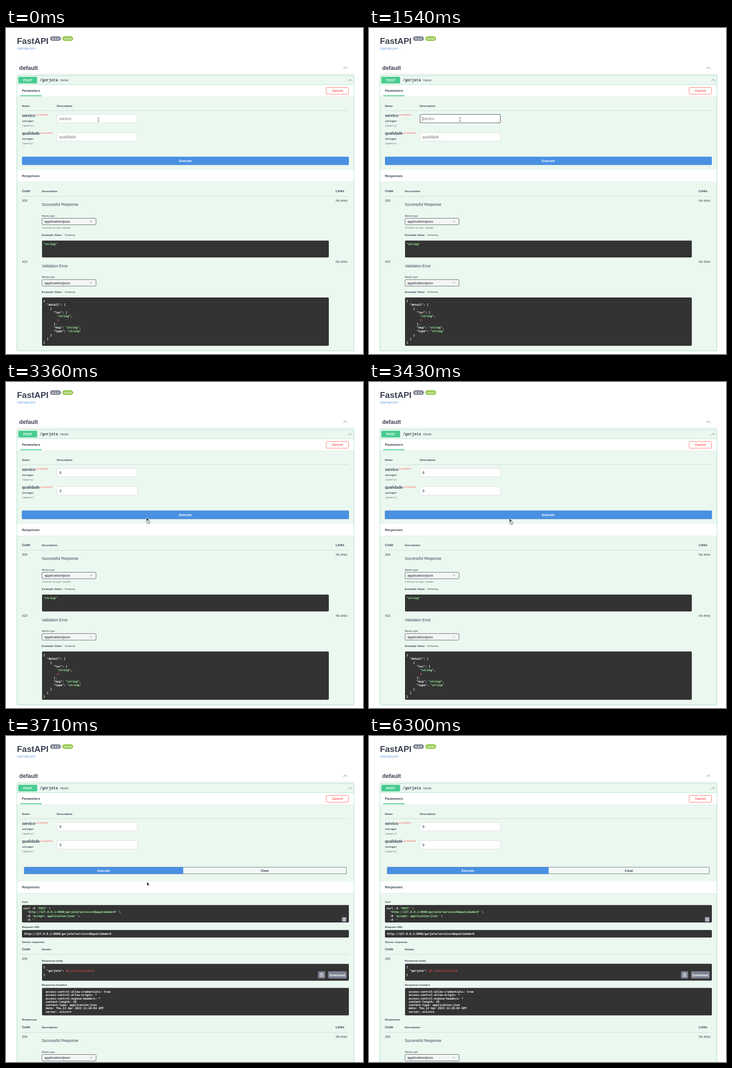
An HTML page that plays this animation: 783 px wide and 715 px high, repeating every 6.37 s.

```html
<!DOCTYPE html>
<html lang="en">
<head>
<meta charset="utf-8">
<title>API docs</title>
<style>
  html, body { margin: 0; width: 100%; height: 100%; overflow: hidden; background: #fff; }
  svg { display: block; width: 783px; height: 715px; }
  text { font-family: "Liberation Sans", Arial, sans-serif; fill: #3b4151; white-space: pre; }
  .b { font-weight: 700; }
  .i { font-style: italic; }
  .m { font-family: "Liberation Mono", monospace; }
  .code { font-family: "DejaVu Sans Mono", monospace; font-weight: 700; fill: #fff; }
  .mid { text-anchor: middle; }
  .w { fill: #fff; }
  .red { fill: #ff6060; }
  .g { fill: #a2fca2; }
  .n { fill: #d34a4a; }
  .ph { fill: #777; }
</style>
</head>
<body>
<svg id="stage" viewBox="0 0 783 715" xmlns="http://www.w3.org/2000/svg"></svg>
<script>
const LOOP = 6370;
const PANEL = '#ebf8f0', EDGE = '#9bdcbc', DARK = '#333', BLUE = '#4990e2', GREY = '#7d8293';

// Markup helpers
const text = (x, y, s, size, cls = '', extra = '') =>
  `<text x="${x}" y="${y}" font-size="${size}" class="${cls}" ${extra}>${s}</text>`;
const rect = (x, y, x2, y2, fill, rx = 0, extra = '') =>
  `<rect x="${x}" y="${y}" width="${x2 - x}" height="${y2 - y}" rx="${rx}" fill="${fill}" ${extra}/>`;
const frame = (x, y, x2, y2, fill, stroke, w = 1, extra = '') =>
  rect(x, y, x2, y2, fill, 2, `stroke="${stroke}" stroke-width="${w}" ${extra}`);
const rule = (x, x2, y, stroke = '#c9d3d0') =>
  `<path d="M${x} ${y}H${x2}" stroke="${stroke}" stroke-width="0.8"/>`;
const chevron = (x, y, w, h) =>
  `<path d="M${x - w} ${y}l${w} ${h}l${w} ${-h}" fill="none" stroke="#666" stroke-width="0.9"/>`;
const group = (id, body) => `<g id="${id}">${body}</g>`;

// Code lines: strings in backticks become green, digits after ~ become red
const code = (x, y, lines, step) => lines.map((line, k) => {
  const body = line.replace(/&/g, '&amp;')
    .replace(/`([^`]*)`/g, '<tspan class="g">$1</tspan>')
    .replace(/~([\d.]+)/, '<tspan class="n">$1</tspan>');
  return text(x, +(y + k * step).toFixed(2), body, 6.23, 'code');
}).join('');

const box = (x, y, x2, y2) => rect(x, y, x2, y2, DARK, 2);

const copyIcon = (x, y, s) => rect(x, y, x + s, y + s, GREY, 2) +
  `<g transform="translate(${x + s / 2} ${y + s / 2}) scale(${s < 12 ? 0.9 : 1})" fill="none" stroke="#fff" stroke-width="0.9">
    <path d="M3 -1V-3H-3V3.6H3V2.4M-1.2 -3.6H1.2M-1.6 -1H1.4M-1.6 1H-0.4M4 0.8H0.6M2 -0.6L0.6 0.8L2 2.2"/></g>`;

const param = (y, name, starX) =>
  text(35, y, name, 8.35, 'b') +
  text(starX, y + 0.7, '*', 8.5, 'b red') +
  text(starX + 5.4, y - 2.8, 'required', 5.6, 'red') +
  text(35, y + 11, 'integer', 6.25, 'm b') +
  text(35, y + 21, '(query)', 6.25, 'm i', 'opacity="0.85"');

const tableHead = (y, label, links) =>
  text(35, y, 'Code', 7.3, 'b') + text(78.5, y, label, 6.25, 'b') +
  (links ? text(723, y, 'Links', 7.3, 'b') : '') + rule(35, 752, y + 8.8);

const response = (y, status, label) =>
  text(35, y, status, 7.3) + text(723, y, 'No links', 7.3, 'i') +
  text(78.5, y + 9.4, label, 8.35) +
  text(78.5, y + 33, 'Media type', 5.85) +
  frame(79, y + 36.5, 197.5, y + 50.8, '#f2f6f4', '#63686e', 1) +
  text(84.5, y + 46.3, 'application/json', 7.35, 'b', 'opacity="0.9"') +
  chevron(186.5, y + 42.4, 2.2, 2.2);

const tabs = y => text(78.5, y, 'Example Value', 6.25, 'b') +
  rect(124.9, y - 6, 125.5, y + 1, '#b5bdbb') + text(128.5, y, 'Schema', 6.25);

const band = (y, label) => rect(24.5, y, 762.5, y + 26.2, '#fff') +
  rule(24.5, 762.5, y + 26.4, '#dde5e1') + text(35, y + 15.6, label, 7.3, 'b');

const header =
  text(24, 34.6, 'FastAPI', 18.6, 'b') +
  rect(96.7, 18.2, 120.3, 28.2, GREY, 5) + text(108.5, 25.6, '0.1.0', 6.7, 'b w mid') +
  rect(123.7, 18.2, 147.1, 28.2, '#8ac23a', 5) + text(135.4, 25.6, 'OAS3', 6.7, 'b w mid') +
  text(24, 47, '/openapi.json', 6.8, '', 'style="fill:#6a9fe0"') +
  text(29, 92, 'default', 12.5, 'b') +
  chevron(744.5, 89.5, 4.4, -4.4) + rule(24, 764, 101, '#d3d5d9');

const panelTop =
  rect(27, 107, 68.3, 121.6, '#49cc90', 1.5) + text(47.7, 117, 'POST', 7.3, 'b w mid') +
  text(74, 117.3, '/gorjeta', 8.35, 'm b') + text(119, 117, 'Home', 6.75) +
  chevron(755, 116.8, 4.4, -4.4) + rule(24, 763, 124.3, EDGE) +
  rect(24.5, 124.8, 762.5, 151, '#fff') + rule(24.5, 762.5, 151.2, '#dde5e1') +
  text(35, 140.3, 'Parameters', 7.3, 'b') + rect(31, 147.6, 78, 149.6, '#49cc90') +
  frame(702.3, 130.3, 751.3, 145.2, '#fff', '#ff7466') + text(727, 140.3, 'Cancel', 7.3, 'b red mid') +
  text(35, 173, 'Name', 6.25, 'b') + text(111.3, 173, 'Description', 6.25, 'b') + rule(35, 752, 181.2) +
  param(194.5, 'servico', 66.2) + param(234.3, 'qualidade', 76) +
  frame(112, 189.5, 288, 208, '#fff', '#dcdfdd', 1, 'id="in1"') +
  frame(112, 229.5, 288, 248, '#fff', '#dcdfdd', 1, 'id="in2"') +
  text(117, 201.9, 'servico', 8.35, 'ph', 'id="val1"') +
  text(117, 241.8, 'qualidade', 8.35, 'ph', 'id="val2"') +
  rect(117, 194, 117.6, 204, '#444', 0, 'id="caret"');

const before =
  rect(34.5, 281.6, 752.5, 301, '#9db7c9', 2.5, 'id="glow"') +
  rect(35, 282.2, 752, 300.4, BLUE, 2) + text(393.3, 294, 'Execute', 7.3, 'b w mid') +
  band(311.2, 'Responses') + tableHead(360.3, 'Description', true) +
  response(380.8, '200', 'Successful Response') +
  text(78.5, 440, 'Controls <tspan class="m">Accept</tspan> header.', 5.75, '', 'style="fill:#5d7568"') +
  tabs(456) + box(79, 466.3, 708, 503.2) + code(82, 475.8, ['`"string"`'], 8.3) +
  response(515.3, '422', 'Validation Error') + tabs(580.8) + box(79, 591, 708, 697) +
  code(82, 601, [
    '{', '  "detail": [', '    {', '      "loc": [', '        `"string"`,', '        ~0', '      ],',
    '      "msg": `"string"`,', '      "type": `"string"`', '    }', '  ]', '}'
  ], 8.3);

const url = 'http://127.0.0.1:8000/gorjeta?servico=8&qualidade=9';
const after =
  band(318.8, 'Responses') + text(35, 366, 'Curl', 6.25, 'b') + box(35, 370.7, 752, 409) +
  code(38, 380, ["curl -X `'POST'` \\", "  `'" + url + "'` \\", "  -H `'accept: application/json'` \\", "  -d `''`"], 8.4) +
  copyIcon(736.5, 397, 10.5) +
  text(35, 421, 'Request URL', 6.25, 'b') + box(35, 425.4, 752, 442) + code(40, 436, [url], 8) +
  text(35, 453.6, 'Server response', 6.25, 'b') + tableHead(470.3, 'Details', false) +
  text(35, 491, '200', 7.3) + text(78.5, 495.2, 'Response body', 6.25, 'b') + box(79, 499.6, 752, 536.6) +
  code(82, 509, ['{', '  "gorjeta": ~16.11111111111111', '}'], 8.4) +
  copyIcon(684.3, 516, 15.8) + rect(706.3, 516, 747.3, 531.8, GREY, 2) +
  text(726.8, 526.5, 'Download', 7.3, 'b w mid') +
  text(78.5, 548, 'Response headers', 6.25, 'b') + box(79, 552.5, 752, 612.8) +
  code(87, 563, [
    'access-control-allow-credentials: true', 'access-control-allow-origin: *',
    'access-control-expose-headers: *', 'content-length: 29', 'content-type: application/json',
    'date: Thu,13 Apr 2023 11:10:04 GMT', 'server: uvicorn'
  ], 7.28) +
  text(35, 624.4, 'Responses', 6.25, 'b') + tableHead(641.3, 'Description', true) +
  response(662, '200', 'Successful Response');

const buttons =
  frame(40, 287.6, 746.5, 302.4, '#f1f8f5', '#8a9094', 1.2, 'id="outline"') +
  rect(40, 287.6, 394, 302.4, BLUE, 1.5, 'id="exec"') +
  text(0, 0, 'Execute', 7.3, 'b w mid', 'id="execText"') + text(0, 0, 'Clear', 7.3, 'b mid', 'id="clearText"');

const arrow = '<path d="M0 0V8.6L2 6.8L3.4 9.8L4.8 9.2L3.4 6.3H6.2Z" fill="#222" stroke="#fff" stroke-width="0.7"/>';
const pointers =
  group('beam', '<path d="M-2 -4.5Q0 -4.5 0 -3V3Q0 4.5 -2 4.5M2 -4.5Q0 -4.5 0 -3M0 3Q0 4.5 2 4.5M-1 1.5H1" fill="none" stroke="#666" stroke-width="0.8"/>') +
  group('arrow', arrow) +
  group('blocked', arrow + '<circle cx="4" cy="10" r="4" fill="#d5dcda" stroke="#8f9996"/><path d="M1.2 7.4L6.8 12.6" stroke="#8f9996"/>') +
  group('hand', '<path d="M-2.4 -4Q-1.2 -4.6 -0.7 -3.4L0 -1.4L3 -1Q4.2 -0.6 4 1L3.4 4H-0.8L-3.4 0.8Q-3 -0.4 -1.6 0.4Z" fill="#fff" stroke="#444" stroke-width="0.9" stroke-linejoin="round"/>');

document.getElementById('stage').innerHTML =
  header + rect(24, 104, 763, 708, PANEL, 2, `id="panel" stroke="${EDGE}"`) + panelTop +
  group('before', before) + group('after', group('shift', after) + buttons) + pointers;

const $ = id => document.getElementById(id);
const set = (id, attrs) => { for (const k in attrs) $(id).setAttribute(k, attrs[k]); };
const show = (id, on) => { $(id).style.display = on ? '' : 'none'; };

// The CSS "ease" curve
function ease(x) {
  if (x <= 0 || x >= 1) return Math.min(1, Math.max(0, x));
  const bez = (u, a, b) => 3 * u * (1 - u) * (1 - u) * a + 3 * u * u * (1 - u) * b + u ** 3;
  let lo = 0, hi = 1;
  for (let k = 0; k < 24; k++) {
    const mid = (lo + hi) / 2;
    if (bez(mid, 0.25, 0.25) < x) lo = mid; else hi = mid;
  }
  return bez(lo, 0.1, 1);
}

// Pointer path: time, x, y
const path = [
  [0, 203, 201], [400, 200, 201], [2750, 200, 201], [3150, 307, 296], [3360, 308, 297],
  [3500, 308, 301], [3640, 308, 305], [3710, 309, 320], [4550, 405, 601], [5080, 406, 603],
  [5400, 412, 730]
];
function pointerAt(t) {
  const k = path.findIndex(p => p[0] > t);
  if (k < 0) return path[path.length - 1].slice(1);
  const [t0, x0, y0] = path[k - 1], [t1, x1, y1] = path[k];
  const u = (t - t0) / (t1 - t0), e = u * u * (3 - 2 * u);
  return [x0 + (x1 - x0) * e, y0 + (y1 - y0) * e];
}

const EVENTS = {
  focus1: 340, type1: 1820, focus2: 2170, type2: 2520, move: 2750,
  hover: 3060, wait: 3290, done: 3464, leave: 3640
};
const BLINK = 500, EXPAND = 300;

function pointerKind(t) {
  const E = EVENTS;
  if (t < E.type1) return 'beam';
  if (t < E.move) return '';
  if (t < E.hover) return 'beam';
  if (t < E.wait) return 'hand';
  if (t < E.done) return 'blocked';
  return t < E.leave ? 'hand' : 'arrow';
}

function field(n, typed, digit, name, focused) {
  $('val' + n).textContent = typed ? digit : name;
  $('val' + n).style.fill = typed ? '#3b4151' : '#777';
  set('in' + n, { stroke: focused ? '#585d60' : '#dcdfdd', 'stroke-width': focused ? 1.2 : 1 });
}

// Typing or focusing restarts the blink
function drawCaret(t, f1, f2) {
  const E = EVENTS;
  const typed = f1 ? t >= E.type1 : t >= E.type2;
  const since = f1 ? (typed ? E.type1 : E.focus1) : (typed ? E.type2 : E.focus2);
  show('caret', (f1 || f2) && (t - since) % (2 * BLINK) < BLINK);
  set('caret', { x: typed ? 122 : 117, y: f1 ? 194 : 234 });
}

function drawButtons(t) {
  const p = ease((t - EVENTS.done) / EXPAND), left = 1 - p;
  const split = 110 + 284 * p, top = 287.6 + 0.5 * left, h = 14.8 + 3.4 * left;
  const base = top + h / 2 + 2.8;
  set('shift', { transform: `translate(0 ${(3.4 * left).toFixed(2)})` });
  set('outline', { y: top, height: h });
  set('exec', { y: top, height: h, width: split - 40 });
  set('execText', { x: (40 + split) / 2, y: base });
  set('clearText', { x: (split + 746.5) / 2, y: base });
}

function draw(t) {
  const E = EVENTS, done = t >= E.done;
  const f1 = t >= E.focus1 && t < E.focus2, f2 = t >= E.focus2 && t < E.wait;
  field(1, t >= E.type1, '8', 'servico', f1);
  field(2, t >= E.type2, '9', 'qualidade', f2);
  drawCaret(t, f1, f2);

  show('before', !done);
  show('after', done);
  show('glow', t >= E.hover);
  set('panel', { height: done ? 640 : 604 });
  if (done) drawButtons(t);

  const [x, y] = pointerAt(t), kind = pointerKind(t);
  for (const id of ['beam', 'arrow', 'blocked', 'hand']) show(id, id === kind);
  if (kind) set(kind, { transform: `translate(${x.toFixed(2)} ${y.toFixed(2)})` });
}

const start = performance.now();
function tick() {
  draw((performance.now() - start) % LOOP);
  requestAnimationFrame(tick);
}
tick();
</script>
</body>
</html>
```
